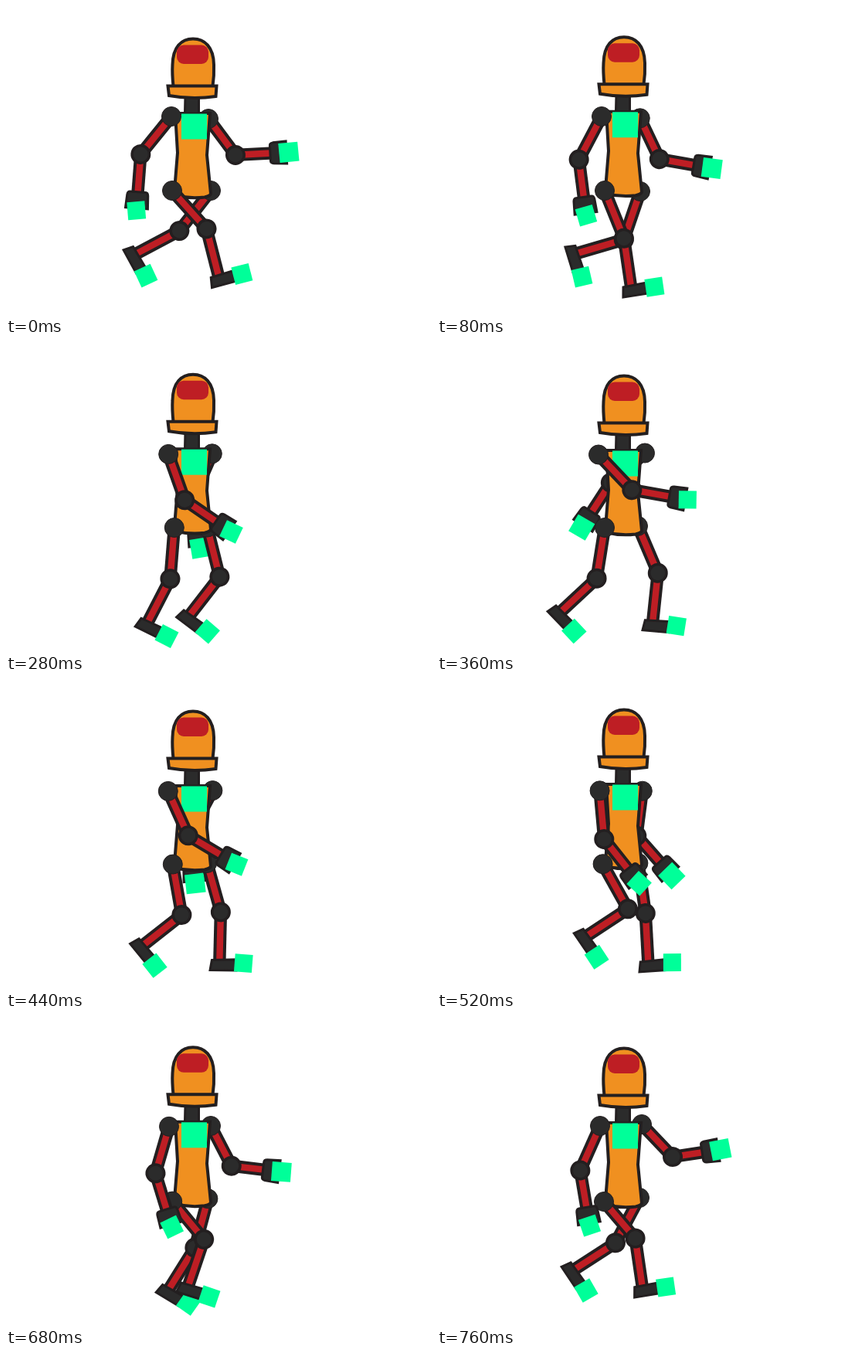
An HTML page with a canvas that plays this animation: 550 px wide and 400 px high, repeating every 0.8 s.

```html
<!DOCTYPE html>
<html lang="en">
<head>
<meta charset="utf-8">
<title>Walking robot</title>
<style>
html, body { margin: 0; width: 100%; height: 100%; overflow: hidden; background: #fff; }
canvas { display: block; }
</style>
</head>
<body>
<canvas id="stage" width="550" height="400"></canvas>
<script>
const ctx = document.getElementById('stage').getContext('2d');
const INK = '#231f20', DARK = '#2b2b2b', RED = '#be1e24', ORANGE = '#f09020', GREEN = '#00ff99';
const STEP = 40, STEPS = 20;

// Key poses; everything moves linearly between them and jumps back at the loop.
const KEYS = [0, 4, 9, 14, 19];
const bounce = [0, -4.5, 0, -5, -2];

// x, y: root joint; upper, lower: bone angles in degrees from straight down, forward positive.
// length: upper bone; reach: elbow to palm; toe: offset from the knee.
const backArm = {
  x: [262, 263.5, 269, 265, 265], y: [146, 144.5, 142.5, 144, 139],
  upper: [36.7, 14, -49, 3, 43.6], lower: [93, 67, -33, 60, 98.6],
  length: [58.5, 58.5, 58.5, 58.5, 58], reach: [69, 69, 69, 69, 62.5], size: 25, twist: -2.5
};
const frontArm = {
  x: [214, 212, 209, 211, 211], y: [143, 143, 144.5, 143, 141],
  upper: [-39, -16.5, 43.5, -4.4, -24], lower: [-4.4, 19, 80, 28, 9.6],
  length: [63, 63, 63, 63, 63], reach: [73, 73, 73, 73, 72.5], size: 23, twist: -9
};
const backLeg = {
  x: [265, 261, 260, 260.5, 262], y: [239, 241, 237, 237, 234],
  upper: [-38, 0.5, 23, 4.5, -28], lower: [-62, -85.5, -6, 5.5, -57],
  length: [66, 66, 66, 65.5, 66], toe: [31, 65.5], size: 23, twist: 3
};
const frontLeg = {
  x: [215, 219, 217, 214, 216], y: [239, 239, 239, 238, 239],
  upper: [42, 2, -9, 38.6, 40.5], lower: [14.3, 2.3, -47, -59, 8.3],
  length: [66.5, 66.5, 66.5, 66.5, 62.5], toe: [30, 68], size: 23, twist: 0
};

function at(values, step) {
  let i = 0;
  while (i < KEYS.length - 2 && step > KEYS[i + 1]) i++;
  const p = (step - KEYS[i]) / (KEYS[i + 1] - KEYS[i]);
  return values[i] + (values[i + 1] - values[i]) * p;
}

const turn = degrees => ctx.rotate(degrees * Math.PI / 180);

function shape(path, fill, width) {
  const p = new Path2D(path);
  ctx.fillStyle = fill;
  ctx.fill(p);
  ctx.strokeStyle = INK;
  ctx.lineWidth = width;
  ctx.stroke(p);
}

function bar(length) {
  ctx.fillStyle = INK;
  ctx.fillRect(-8.2, 0, 16.4, length);
  ctx.fillStyle = RED;
  ctx.fillRect(-4.2, 3, 8.4, length - 6);
}

function joint(width) {
  ctx.beginPath();
  ctx.arc(0, 0, 13 - width / 2, 0, 7);
  ctx.fillStyle = DARK;
  ctx.fill();
  ctx.strokeStyle = INK;
  ctx.lineWidth = width;
  ctx.stroke();
}

function square(x, y, size, twist) {
  ctx.save();
  ctx.translate(x, y);
  turn(twist);
  ctx.fillStyle = GREEN;
  ctx.fillRect(-size / 2, -size / 2, size, size);
  ctx.restore();
}

function hand({ reach, size, twist }, step) {
  const palm = at(reach, step);
  bar(palm - 20);
  ctx.save();
  ctx.translate(0, palm);
  shape('M-10-24H10Q13-24 13.5-20L14.5-3H9V-9H-9V-3H-14.5L-13.5-20Q-13-24-10-24Z', DARK, 3);
  ctx.restore();
  square(0, palm, size, twist);
}

function foot({ toe, size, twist }) {
  bar(65);
  shape('M-10 62.5L22 61V75L-12 75.5Z', DARK, 3);
  square(...toe, size, twist);
}

function limb(part, step, end) {
  const upper = at(part.upper, step), lower = at(part.lower, step);
  const length = at(part.length, step);
  ctx.save();
  ctx.translate(at(part.x, step), at(part.y, step));
  ctx.save();
  turn(-upper);
  bar(length);
  ctx.translate(0, length);
  turn(upper - lower);
  end(part, step);
  joint(3.5);
  ctx.restore();
  joint(1);
  ctx.restore();
}

function body(step) {
  ctx.save();
  ctx.translate(0, at(bounce, step));
  shape('M219 139H264L260 193L265 243Q264 246 257 247.5Q238 250 217.5 245L222 190Z', ORANGE, 4);
  shape('M232 117H249.5V139H231.5Z', DARK, 3);
  square(243.5, 156, 33, 0);
  shape('M216.5 104C215.5 94 215 84 215.5 76C216 53 227 42.5 242 42.5C257 42.5 268.5 53 269 76C269.3 84 269 94 267.5 104Z', ORANGE, 4);
  shape('M209.5 103.5H272.5L271.5 117Q241 121.5 211 116Z', ORANGE, 4);
  ctx.beginPath();
  ctx.roundRect(221, 50.5, 41, 24.5, 9);
  ctx.fillStyle = RED;
  ctx.fill();
  ctx.restore();
}

function draw(now) {
  const step = Math.floor(now / STEP) % STEPS;
  ctx.fillStyle = '#fff';
  ctx.fillRect(0, 0, 550, 400);
  limb(backArm, step, hand);
  limb(backLeg, step, foot);
  body(step);
  limb(frontLeg, step, foot);
  limb(frontArm, step, hand);
}

let start;
function tick(now) {
  start ??= now;
  draw(now - start);
  requestAnimationFrame(tick);
}
draw(0);
requestAnimationFrame(tick);
</script>
</body>
</html>
```
